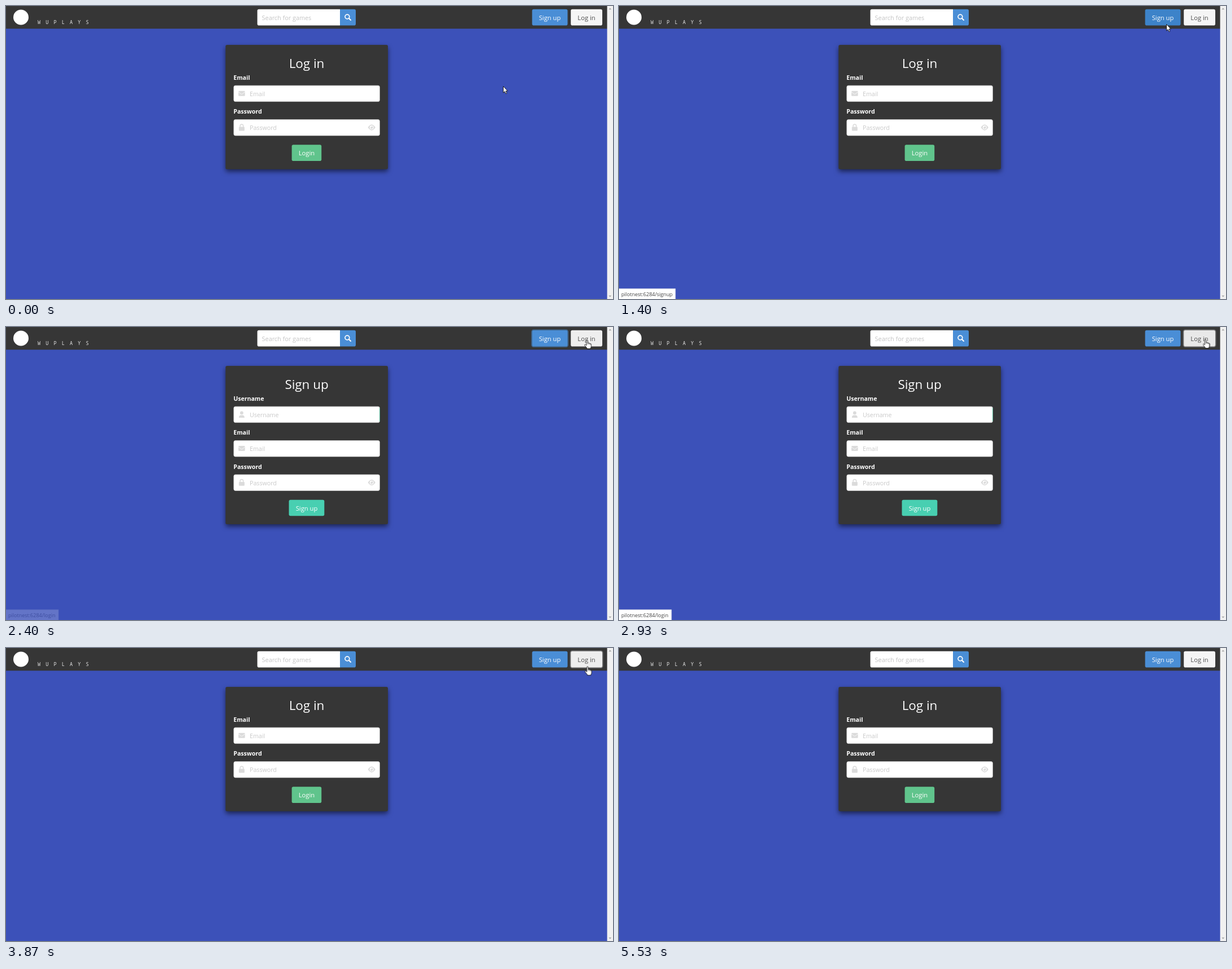
An HTML page for the animation above (5590 ms loop, 1076 by 520 pixels).

```html
<!DOCTYPE html>
<html lang="en">
<head>
<meta charset="utf-8">
<title>Log in and sign up</title>
<style>
html, body { margin: 0; width: 100%; height: 100%; overflow: hidden; background: #3c51b9; }
svg { display: block; width: 1076px; height: 520px; font-family: "Open Sans", "Noto Sans", sans-serif; }

.title { font-size: 22.4px; fill: #fff; text-anchor: middle; }
.label { font-size: 10.55px; font-weight: 700; fill: #fff; }
.hint { font-size: 10.65px; fill: #c9c9c9; }
.search { font-size: 10.85px; fill: #c4c4c4; }
.btn { font-size: 11.2px; fill: #fff; text-anchor: middle; }
.dark { fill: #4f4f4f; }
.status text { font-size: 9px; fill: #444; }
.status rect { fill: #fff; stroke: #d5d7e2; stroke-width: .7; }
.brand { font: 8.6px "Noto Sans Mono", "DejaVu Sans Mono", monospace; letter-spacing: 9.1px; fill: #e6e6e6; }
.card { fill: #363636; filter: drop-shadow(0 4px 4px rgba(0, 0, 0, .55)); }
.icon { fill: #dbdbdb; }
.ring { fill: none; stroke-width: 1.6; opacity: 0; }
.blue { fill: #4a8ed6; }

/* One shared 5590 ms clock; 1% = 55.9 ms */
.anim { animation: 5590ms step-end infinite; }
#login { animation-name: login; }
#signup { animation-name: signup; }
#upBtn { animation-name: up-btn; }
#inBtn { animation-name: in-btn; fill: #f5f5f5; }
#upRing { animation-name: up-ring; }
#inRing { animation-name: in-ring; }
#upStatus { animation-name: up-status; }
#inStatus { animation-name: in-status; }
#arrow { animation-name: arrow; }
#hand { animation-name: hand; }
#cursor { animation-name: move; animation-timing-function: linear; }

@keyframes login {
  0% { opacity: 1; } 26.29% { opacity: 0; } 53.66%, 100% { opacity: 1; }
}
@keyframes signup {
  0% { opacity: 0; } 26.29% { opacity: 1; } 53.66%, 100% { opacity: 0; }
}
@keyframes up-btn {
  0% { fill: #4a8ed6; } 8.4% { fill: #4287d1; } 25.04% { fill: #3d83c9; }
  26.29% { fill: #4287d1; } 39.35%, 100% { fill: #4a8ed6; }
}
@keyframes in-btn {
  0% { fill: #f5f5f5; } 40.6% { fill: #eee; } 52.41% { fill: #e8e8e8; }
  53.66% { fill: #eee; } 70.48%, 100% { fill: #f5f5f5; }
}
@keyframes up-ring {
  0% { opacity: 0; } 26.29% { opacity: .45; } 52.41%, 100% { opacity: 0; }
}
@keyframes in-ring {
  0% { opacity: 0; } 52.41% { opacity: .3; } 98.92%, 100% { opacity: 0; }
}
@keyframes up-status {
  0% { opacity: 0; } 11.98% { opacity: .3; } 13.05% { opacity: .7; } 14.31% { opacity: 1; }
  27.54% { opacity: .7; } 28.62% { opacity: .35; } 29.87% { opacity: .04; } 35.77%, 100% { opacity: 0; }
}
@keyframes in-status {
  0% { opacity: 0; } 42.93% { opacity: .2; } 44.18% { opacity: .6; } 45.25% { opacity: 1; }
  55.99% { opacity: .5; } 57.24%, 100% { opacity: 0; }
}
@keyframes arrow {
  0% { opacity: 1; } 8.4% { opacity: 0; } 19.14% { opacity: 1; } 26.29% { opacity: 0; }
  70.48% { opacity: 1; } 75.13%, 100% { opacity: 0; }
}
@keyframes hand {
  0% { opacity: 0; } 8.4% { opacity: 1; } 19.14% { opacity: 0; } 26.29% { opacity: 1; }
  70.48%, 100% { opacity: 0; }
}
@keyframes move {
  0%, 1% { transform: translate(881px, 142px); animation-timing-function: ease-in-out; }
  8.4% { transform: translate(985px, 25px); animation-timing-function: ease-out; }
  10.73%, 35.2% { transform: translate(970px, 32px); animation-timing-function: ease-in-out; }
  42.93% { transform: translate(1028px, 22px); animation-timing-function: ease-out; }
  45.25%, 68.6% { transform: translate(1037.5px, 21px); animation-timing-function: ease-in; }
  73.88%, 100% { transform: translate(690px, 448px); }
}
</style>
</head>
<body>
<svg viewBox="0 0 1076 520" xmlns="http://www.w3.org/2000/svg">
  <defs>
    <rect id="field" x="403.8" y="141.2" width="258.6" height="28.4" rx="2.8" fill="#fff" stroke="#dbdbdb" stroke-width=".7"/>
    <g id="mail" class="icon">
      <rect x="412" y="150.7" width="11.6" height="9" rx="1.3"/>
      <path d="M412 152.6 L416.6 156 Q417.8 156.8 419 156 L423.6 152.6" fill="none" stroke="#fff" stroke-width=".8"/>
    </g>
    <g id="lock" class="icon">
      <rect x="412.8" y="214.6" width="10" height="6.8" rx="1.2"/>
      <path d="M415 215 V212.8 A2.8 2.8 0 0 1 420.6 212.8 V215" fill="none" stroke="#dbdbdb" stroke-width="1.5"/>
    </g>
    <g id="eye">
      <path class="icon" d="M641.6 215.6 Q648.2 205.4 654.8 215.6 Q648.2 225.8 641.6 215.6 Z"/>
      <circle cx="648.2" cy="215.6" r="3.5" fill="#fff"/>
      <path class="icon" d="M648.2 213.2 A2.4 2.4 0 1 1 645.8 215.6 Q648 215.8 648.2 213.2 Z"/>
    </g>
    <g id="mailRow">
      <text class="label" x="403.3" y="131">Email</text>
      <use href="#field"/>
      <use href="#mail"/>
      <text class="hint" x="432" y="160">Email</text>
    </g>
    <g id="passRow">
      <text class="label" x="403.3" y="191.4">Password</text>
      <use href="#field" y="60.4"/>
      <use href="#lock"/>
      <use href="#eye"/>
      <text class="hint" x="432" y="220.4">Password</text>
    </g>
  </defs>

  <rect width="1076" height="520" fill="#3c51b9"/>

  <rect width="1066" height="40.3" fill="#363636"/>
  <circle cx="26.5" cy="20" r="13.5" fill="#fff"/>
  <text class="brand" x="56" y="32">WUPLAYS</text>

  <path d="M448.3 5.8 H592 V34.5 H448.3 Q445.5 34.5 445.5 31.7 V8.6 Q445.5 5.8 448.3 5.8 Z" fill="#fff"/>
  <text class="search" x="453.6" y="25">Search for games</text>
  <path class="blue" d="M592 5.8 H617.2 Q620 5.8 620 8.6 V31.7 Q620 34.5 617.2 34.5 H592 Z"/>
  <g fill="none" stroke="#fff" stroke-linecap="round">
    <circle cx="604.9" cy="19" r="3.9" stroke-width="1.7"/>
    <path d="M608 22.1 L611 25" stroke-width="2.1"/>
  </g>

  <rect id="upRing" class="ring anim" x="931.8" y="5" width="64.5" height="30.3" rx="3.5" stroke="#4a9cf0"/>
  <rect id="upBtn" class="blue anim" x="932.6" y="5.8" width="62.9" height="28.7" rx="2.8"/>
  <text class="btn" x="964" y="24.8">Sign up</text>
  <rect id="inRing" class="ring anim" x="1000.4" y="5" width="57.4" height="30.3" rx="3.5" stroke="#f5f5f5"/>
  <rect id="inBtn" class="anim" x="1001.2" y="5.8" width="55.8" height="28.7" rx="2.8"/>
  <text class="btn dark" x="1029" y="24.8">Log in</text>

  <g id="login" class="anim">
    <rect class="card" x="389.2" y="69" width="287.8" height="220.8" rx="2.8"/>
    <text class="title" x="533" y="110">Log in</text>
    <use href="#mailRow"/>
    <use href="#passRow"/>
    <rect x="506.6" y="246.3" width="52.6" height="28.7" rx="2.8" fill="#60c48c"/>
    <text class="btn" x="533" y="265.3">Login</text>
  </g>

  <g id="signup" class="anim" opacity="0">
    <rect class="card" x="389.2" y="69" width="287.8" height="281" rx="2.8"/>
    <text class="title" x="533" y="110">Sign up</text>
    <text class="label" x="403.3" y="131">Username</text>
    <use href="#field"/>
    <path d="M662.4 143.5 V167.5" stroke="#55c9a6" stroke-width=".8"/>
    <g class="icon">
      <circle cx="417.8" cy="152.4" r="2.9"/>
      <path d="M412.8 160.9 Q412.8 156.4 416.6 156.4 H419 Q422.8 156.4 422.8 160.9 Z"/>
    </g>
    <text class="hint" x="432" y="160">Username</text>
    <use href="#mailRow" y="60.4"/>
    <use href="#passRow" y="60.4"/>
    <rect x="501.5" y="306.7" width="62.8" height="28.6" rx="2.8" fill="#48cfb1"/>
    <text class="btn" x="533" y="325.7">Sign up</text>
  </g>

  <g id="upStatus" class="status anim" opacity="0">
    <rect x="-2" y="501.8" width="102" height="20"/>
    <text x="4" y="514.8">pilotnest:6284/signup</text>
  </g>
  <g id="inStatus" class="status anim" opacity="0">
    <rect x="-2" y="501.8" width="95" height="20"/>
    <text x="4" y="514.8">pilotnest:6284/login</text>
  </g>

  <rect x="1065.6" width="10.4" height="520" fill="#f1f1f1"/>
  <path d="M1068.3 6.2 L1070.8 3.4 L1073.3 6.2 Z M1068.3 513.8 L1070.8 516.6 L1073.3 513.8 Z" fill="#a8a8a8"/>

  <g id="cursor" class="anim" fill="#fff" stroke="#111" stroke-width=".9" stroke-linejoin="round">
    <path id="arrow" class="anim" d="M.5 .5 V12 L3.1 9.6 L4.9 13.6 L6.8 12.8 L5 8.9 H8.4 Z"/>
    <g id="hand" class="anim" opacity="0">
      <path d="M.8 10.8 V2.6 Q.8 1.2 2 1.2 Q3.2 1.2 3.2 2.6 V6.4 Q5.1 5.6 5.5 7 Q7.1 6.3 7.5 7.7 Q9.2 7.4 9.2 9 V12.4 Q9.2 14.4 8 15.3 V16.6 H1.6 V15.3 L-2.4 10.6 Q-2.9 9.4 -1.7 9 Q-.7 8.8 .8 10.8 Z"/>
      <path d="M3.2 6.4 V9 M5.5 7 V9.2 M7.5 7.7 V9.4" fill="none" stroke-width=".6"/>
    </g>
  </g>
</svg>
</body>
</html>
```
